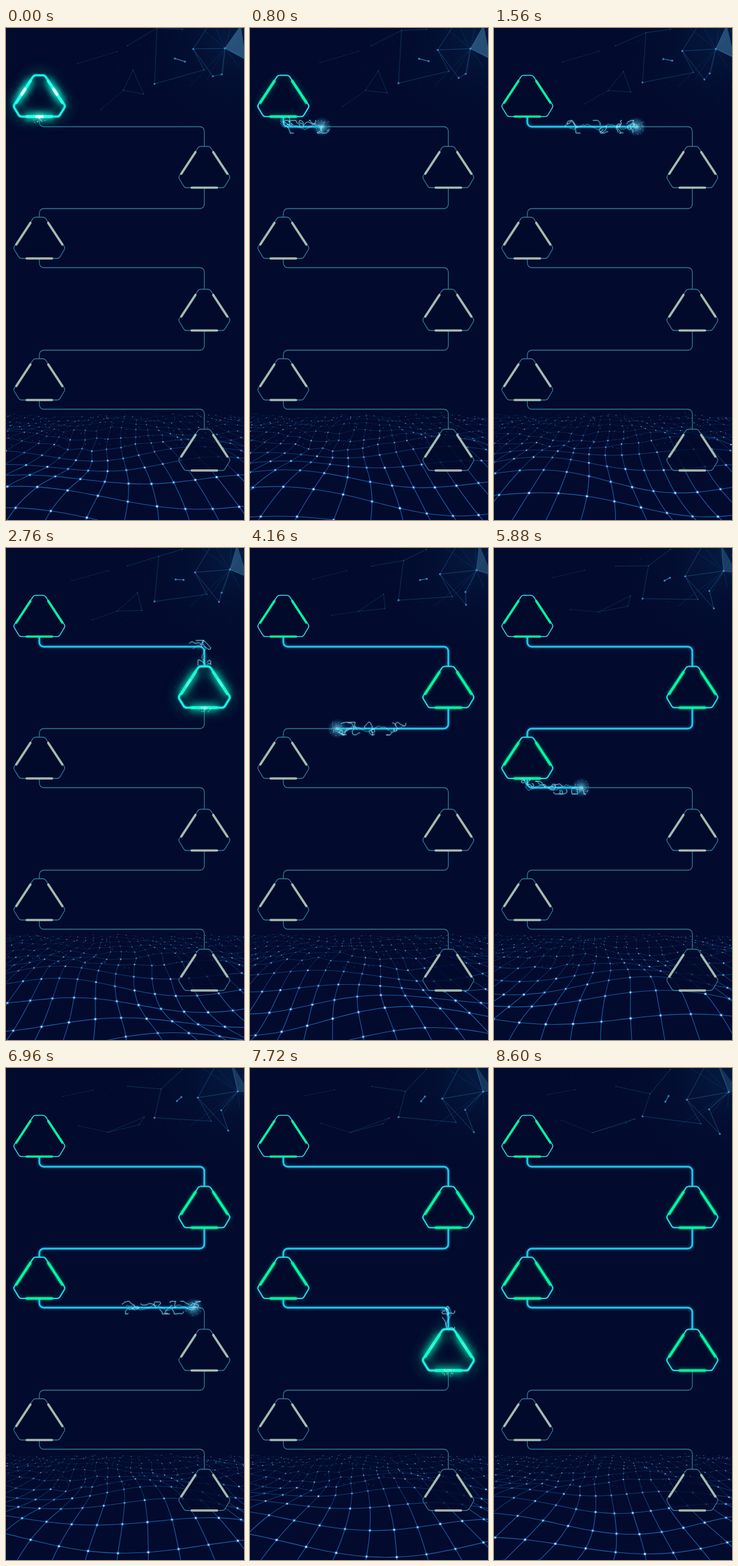
Write an HTML page with a canvas that moves like this. It is 375 px wide and 775 px high and loops after 8640 ms.

```html
<!DOCTYPE html>
<html lang="en">
<head>
<meta charset="utf-8">
<title>Energy path</title>
<style>
html, body { margin: 0; width: 100%; height: 100%; overflow: hidden; background: #020a2d; }
canvas { display: block; width: 375px; height: 775px; }
</style>
</head>
<body>
<canvas id="stage"></canvas>
<script>
const W = 375, H = 775, LOOP = 8640, STEP = 40;
const FIRST = 275, PERIOD = 2463, LEAD = 368, SPEED = 0.1463, TRAIL = 106;
const IDLE = '#2b7890';
const canvas = document.getElementById('stage');
const ctx = canvas.getContext('2d');
const dpr = window.devicePixelRatio || 1;
canvas.width = W * dpr;
canvas.height = H * dpr;
ctx.scale(dpr, dpr);

const nodes = [74.5, 186.5, 298, 411.5, 521, 632].map((y, i) => ({ x: i % 2 ? 312.5 : 52.5, y }));
const bends = [155.5, 284.5, 377.5, 507.5, 600.5];
const links = bends.map((by, i) => {
  const a = nodes[i], b = nodes[i + 1];
  return makeLink([[a.x, a.y + 65], [a.x, by], [b.x, by], [b.x, b.y]]);
});

const clamp = (v, a = 0, b = 1) => Math.min(b, Math.max(a, v));
const mix = (a, b, k) => a + (b - a) * k;

function rng(seed) {
  let s = (seed * 2654435761 + 12345) >>> 0;
  return () => {
    s = (s + 0x6D2B79F5) >>> 0;
    let r = Math.imul(s ^ (s >>> 15), 1 | s);
    r ^= r + Math.imul(r ^ (r >>> 7), 61 | r);
    return ((r ^ (r >>> 14)) >>> 0) / 4294967296;
  };
}

function hash(a, b) {
  const v = Math.sin(a * 127.1 + b * 311.7) * 43758.5453;
  return v - Math.floor(v);
}

function makeLink(pts) {
  const legs = [];
  let total = 0;
  for (let i = 1; i < pts.length; i++) {
    const [x, y] = pts[i - 1], [u, v] = pts[i];
    const len = Math.hypot(u - x, v - y);
    legs.push({ x, y, dx: (u - x) / len, dy: (v - y) / len, from: total, len });
    total += len;
  }
  const at = d => {
    const g = legs.find(l => d <= l.from + l.len) || legs[2];
    const k = d - g.from;
    return { x: g.x + g.dx * k, y: g.y + g.dy * k, dx: g.dx, dy: g.dy };
  };
  const path = new Path2D();
  path.moveTo(...pts[0]);
  path.arcTo(...pts[1], ...pts[2], 7);
  path.arcTo(...pts[2], ...pts[3], 7);
  path.lineTo(...pts[3]);
  return { path, at, total };
}

const shell = new Path2D();
const corners = [[8.5, 0], [41, 48.5], [31, 65], [-31, 65], [-41, 48.5], [-8.5, 0]];
shell.moveTo(0, 0);
corners.forEach((p, i) => shell.arcTo(...p, ...(corners[i + 1] || [0, 0]), 5));
shell.closePath();

const sides = [[-14, 9, -36.3, 43], [14, 9, 36.3, 43], [-20, 65, 20, 65]];
// the part of each bar between two fractions of its length
function barPath(from, to) {
  const p = new Path2D();
  sides.forEach(([a, b, c, d]) => {
    p.moveTo(mix(a, c, from), mix(b, d, from));
    p.lineTo(mix(a, c, to), mix(b, d, to));
  });
  return p;
}
const bars = barPath(0, 1), cores = barPath(0.38, 0.62);

function stroke(path, color, width, blur = 0, glow = color) {
  ctx.strokeStyle = color;
  ctx.lineWidth = width;
  ctx.shadowBlur = blur * dpr;
  ctx.shadowColor = glow;
  ctx.stroke(path);
  ctx.shadowBlur = 0;
}

function dot(x, y, r, color) {
  ctx.fillStyle = color;
  ctx.beginPath();
  ctx.arc(x, y, r, 0, 7);
  ctx.fill();
}

function halo(x, y, r, inner, mid) {
  const g = ctx.createRadialGradient(x, y, 0, x, y, r);
  g.addColorStop(0, inner);
  g.addColorStop(0.4, mid);
  g.addColorStop(1, 'rgba(20,110,160,0)');
  ctx.fillStyle = g;
  ctx.fillRect(x - r, y - r, 2 * r, 2 * r);
}

function drawBackground() {
  ctx.fillStyle = '#020a2d';
  ctx.fillRect(0, 0, W, H);
  const g = ctx.createRadialGradient(355, 15, 0, 355, 15, 200);
  g.addColorStop(0, 'rgba(8,54,96,.36)');
  g.addColorStop(0.4, 'rgba(4,32,70,.16)');
  g.addColorStop(1, 'rgba(2,10,45,0)');
  ctx.fillStyle = g;
  ctx.fillRect(0, 0, W, 230);
}

// start x, start y, end x, end y
const web = [
  [234, 88, 234, 76], [238, 0, 246, 41], [266, 48, 270, 53], [282, 53, 275, 44],
  [295, 33, 304, 50], [345, 32, 370, 38], [318, -2, 334, -6], [340, 73, 339, 65],
  [326, 76, 356, 104], [312, 66, 326, 88], [378, 50, 384, 34], [370, -4, 352, -8],
  [113, 56, 84, 42], [175, 37, 128, 34], [191, 28, 192, 29], [185, 98, 155, 102],
  [200, 66, 222, 80], [217, 104, 208, 86], [150, 128, 106, 82], [278, 2, 278, 2]
];
const edges = [[0, 1], [1, 19], [4, 5], [4, 6], [4, 8], [5, 7], [7, 8], [4, 9], [5, 10],
  [5, 11], [12, 13], [15, 16], [16, 17], [15, 18], [15, 17], [1, 14], [0, 9]];

function drawWeb(p) {
  const pts = web.map(([a, b, c, d]) => [mix(a, c, p), mix(b, d, p)]);
  const shade = x => 0.16 + 0.36 * clamp(x / W) ** 2;
  ctx.lineWidth = 1;
  edges.forEach(([i, j]) => {
    const a = pts[i], b = pts[j];
    ctx.strokeStyle = `rgba(44,130,180,${shade((a[0] + b[0]) / 2)})`;
    ctx.beginPath();
    ctx.moveTo(...a);
    ctx.lineTo(...b);
    ctx.stroke();
  });
  ctx.fillStyle = `rgba(90,160,205,${mix(0.42, 0.2, p)})`;
  ctx.beginPath();
  [5, 10, 11].forEach(i => ctx.lineTo(...pts[i]));
  ctx.fill();
  ctx.strokeStyle = 'rgba(60,150,200,.14)';
  ctx.beginPath();
  for (let i = 0; i < 9; i++) {
    ctx.moveTo(...pts[5]);
    ctx.lineTo(290 + i * 13, i % 2 ? -4 : 92 - i * 5);
  }
  ctx.stroke();
  ctx.lineWidth = 1.4;
  ctx.strokeStyle = 'rgba(60,165,215,.65)';
  ctx.beginPath();
  ctx.moveTo(...pts[2]);
  ctx.lineTo(...pts[3]);
  ctx.stroke();
  pts.forEach(([x, y], i) => {
    const bright = [0, 2, 3, 4, 5, 7, 8].includes(i);
    dot(x, y, bright ? 1.6 : 1, `rgba(60,165,220,${bright ? 0.75 : shade(x)})`);
  });
  const r = rng(9);
  for (let i = 0; i < 40; i++) {
    dot(85 + r() * 290 + 8 * p, r() * 125 - 6 * p, 0.6, `rgba(60,140,190,${0.1 + r() * 0.2})`);
  }
}

// row 0 lies in front; each row further back is nearer to the horizon
function floorPoint(c, k, t) {
  const a = t / LOOP * Math.PI * 2;
  const depth = 187 * 0.79 ** k;
  const wave = 0.1 * Math.sin(c * 0.55 + k * 0.6 - a) + 0.07 * Math.sin(c * 0.31 - k * 0.9 + a * 1.5);
  const rough = k > 4 ? 5 * (hash(c, k) - 0.5) : 0;
  const sway = 0.22 * Math.sin(k * 0.8 + c * 0.4 + a) + (k > 4 ? 0.3 * (hash(k, c) - 0.5) : 0);
  return [
    185 - 8 * Math.sin(a / 2) + (10 + 0.23 * depth) * (c + sway),
    598 + depth * (1 + wave) + rough
  ];
}

function drawFloor(t) {
  const span = 16, grid = [];
  for (let k = -2; k < 12; k++) {
    const row = [];
    for (let c = -span; c <= span; c++) row.push(floorPoint(c, k, t));
    grid.push(row);
  }
  const fade = y => clamp((y - 606) / 110);
  const curve = pts => {
    for (let i = 0; i < pts.length - 1; i++) {
      const [p, a, b, q] = [pts[i - 1] || pts[i], pts[i], pts[i + 1], pts[i + 2] || pts[i + 1]];
      if (Math.max(a[0], b[0]) < -20 || Math.min(a[0], b[0]) > W + 20) continue;
      const f = fade((a[1] + b[1]) / 2);
      ctx.strokeStyle = `rgba(28,122,204,${0.1 + 0.68 * f})`;
      ctx.lineWidth = 0.6 + 0.5 * f;
      ctx.beginPath();
      ctx.moveTo(...a);
      ctx.bezierCurveTo(a[0] + (b[0] - p[0]) / 6, a[1] + (b[1] - p[1]) / 6,
        b[0] - (q[0] - a[0]) / 6, b[1] - (q[1] - a[1]) / 6, ...b);
      ctx.stroke();
    }
  };
  grid.forEach(curve);
  grid[0].forEach((_, j) => curve(grid.map(row => row[j])));
  grid.forEach((row, i) => row.forEach(([x, y], j) => {
    if (x < -4 || x > W + 4 || y > H + 4) return;
    const f = fade(y), k = hash(j, i + 3);
    if (f > 0.3) dot(x, y, 1.6 + 1.6 * f, `rgba(30,140,240,${0.25 * f})`);
    dot(x, y, 0.7 + 1 * f * (0.7 + 0.3 * k), `rgba(190,232,255,${clamp(0.25 + f * 0.7 + (k - 0.5) * 0.5)})`);
  }));
  const r = rng(31);
  for (let i = 0; i < 130; i++) {
    const x = r() * W, y = 608 + r() * 52;
    dot(x, y + 3 * Math.sin(t / LOOP * 6.28 + x / 30), 0.6, `rgba(110,190,250,${0.15 + r() * 0.55})`);
  }
}

function drawNode(n, i, t, seed) {
  const age = t - (FIRST + PERIOD * i - LEAD);
  const lit = i < 4 && age >= 0;
  ctx.save();
  ctx.translate(n.x, n.y);
  ctx.lineCap = 'round';
  ctx.fillStyle = 'rgba(2,10,45,.75)';
  ctx.fill(shell);
  if (!lit) {
    stroke(shell, IDLE, 1.3);
    stroke(bars, '#a2bcae', 3.6);
    ctx.restore();
    return;
  }
  const rest = i ? 0.3 : 0;
  const flare = clamp(0.6 + age / 200) * (1 - clamp((age - 420) / 600));
  const glow = Math.max(rest, flare);
  if (glow > 0) {
    ctx.globalAlpha = clamp(glow * 1.3);
    stroke(shell, '#00e8cc', 2 + flare, 8 + 14 * flare, '#00f5b8');
    ctx.globalAlpha = 1;
  }
  stroke(shell, flare > 0.3 ? '#20f8ec' : '#2adcf0', 1.5 + 0.9 * flare, 3 * glow);
  stroke(bars, '#00ffa6', 3.6, 10 * glow, '#00ff9c');

  if (flare > 0) {
    const hot = 1 - clamp((age - 80) / 400);
    ctx.globalAlpha = flare;
    stroke(bars, '#14f7cf', 4.4, 14, '#00ffd0');
    ctx.globalAlpha = flare * hot;
    stroke(bars, '#30fff0', 4, 12, '#00f0ff');
    stroke(cores, '#dcfffa', 4.5, 8, '#6ffff4');
    ctx.globalAlpha = 1;
    const r = rng(seed + i);
    for (let k = 0; k < 46; k++) {
      const a = r() * Math.PI * 2, d = 36 + r() * 16;
      dot(Math.cos(a) * d, 38 + Math.sin(a) * d * 0.85, 0.5, `rgba(60,255,210,${0.35 * flare * r()})`);
    }
    for (let k = 0; k < 20; k++) {
      const tint = r() < 0.35 ? '255,150,190' : '200,255,255';
      dot((r() - 0.5) * 18, 66 + (r() - 0.3) * 12, 0.7, `rgba(${tint},${0.7 * flare})`);
    }
  }
  ctx.restore();
}

function drawSparks(link, head, seed) {
  const r = rng(seed);
  const trace = (alpha, points) => {
    ctx.beginPath();
    points.forEach(([back, off]) => {
      const d = head - back;
      if (d < 0 || d > link.total) return;
      const p = link.at(d);
      ctx.lineTo(p.x - p.dy * off, p.y + p.dx * off);
    });
    ctx.strokeStyle = `rgba(205,252,255,${alpha})`;
    ctx.lineWidth = 0.8;
    ctx.shadowColor = '#18d0ff';
    ctx.shadowBlur = 3 * dpr;
    ctx.stroke();
    ctx.shadowBlur = 0;
  };
  const thread = [];
  const phase = r() * 6;
  for (let back = TRAIL; back >= 0; back -= 2) {
    thread.push([back, 3.5 * Math.sin(back * 0.16 + phase) + (r() - 0.5) * 2.5]);
  }
  trace(0.5, thread);
  [5, 30, 56, 94].forEach(clump => {
    for (let n = 0; n < 3; n++) {
      const curl = [];
      let back = clump + (r() - 0.5) * 8, off = (r() - 0.5) * 6, turn = r() * 6;
      for (let k = 0; k < 13; k++) {
        turn += (r() - 0.4) * 2;
        back += Math.cos(turn) * 2.2;
        off = clamp(off + Math.sin(turn) * 2.2, -10, 10);
        curl.push([back, off]);
      }
      trace(0.85, curl);
    }
  });
}

function drawHead(link, head, seed) {
  if (head < 0 || head > link.total) return;
  const p = link.at(head), r = rng(seed + 77);
  ctx.globalAlpha = clamp(head / 30);
  halo(p.x, p.y, 16, 'rgba(150,235,245,.75)', 'rgba(70,170,205,.5)');
  for (let i = 0; i < 40; i++) {
    const a = r() * 7, d = 13 * Math.sqrt(r());
    dot(p.x + Math.cos(a) * d, p.y + Math.sin(a) * d, 0.6, `rgba(190,245,255,${0.2 + r() * 0.45})`);
  }
  ctx.globalAlpha = 1;
}

function drawLink(link, i, t) {
  stroke(link.path, IDLE, 1.3);
  const head = (t - FIRST - PERIOD * i) * SPEED;
  if (i > 2 || head <= 0) return;
  ctx.save();
  ctx.setLineDash([Math.min(head, link.total + 9), 999]);
  stroke(link.path, 'rgba(0,150,205,.4)', 3.6, 5, '#0090c8');
  stroke(link.path, '#25d2ee', 1.9, 2, '#10b8e8');
  ctx.restore();
}

function draw(t) {
  const seed = Math.floor(t / STEP) + 1;
  ctx.lineJoin = 'round';
  drawBackground();
  drawWeb(t / LOOP);
  drawFloor(t);
  links.forEach((l, i) => drawLink(l, i, t));
  nodes.forEach((n, i) => drawNode(n, i, t, seed));
  links.slice(0, 3).forEach((l, i) => {
    const head = (t - FIRST - PERIOD * i) * SPEED;
    if (head <= 0 || head > l.total + TRAIL) return;
    drawHead(l, head, seed);
    drawSparks(l, head, seed);
  });
}

const start = performance.now();
function tick() {
  const t = (performance.now() - start) % LOOP;
  draw(Math.floor(t / STEP) * STEP);
  requestAnimationFrame(tick);
}
tick();
</script>
</body>
</html>
```
